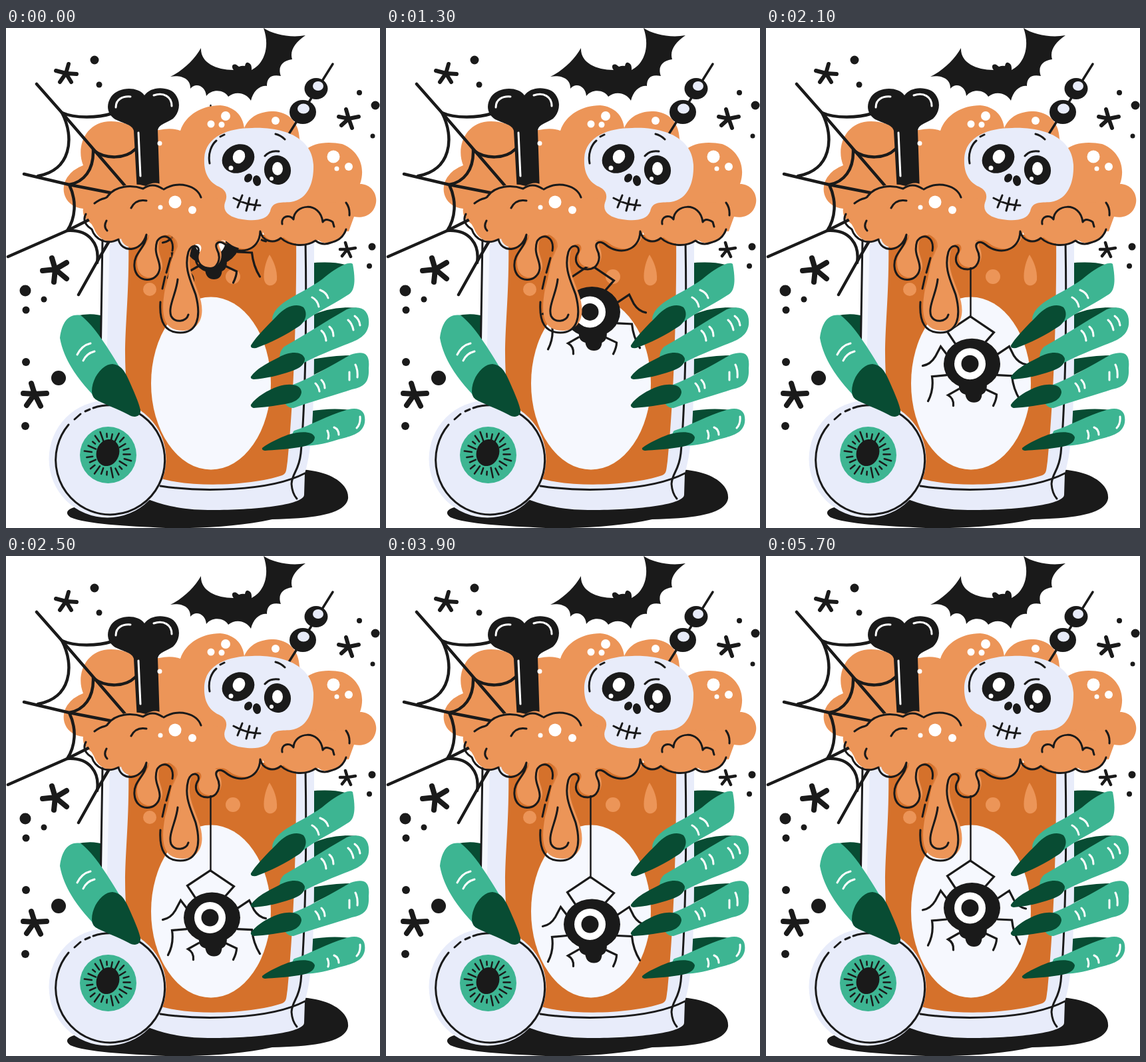
An HTML page that plays this animation: 562 px wide and 750 px high, repeating every 8 s.

```html
<!DOCTYPE html>
<html lang="en">
<head>
<meta charset="utf-8">
<title>Spooky drink</title>
<style>
html, body { margin: 0; width: 100%; height: 100%; overflow: hidden; background: #fff }
svg { display: block; width: 100vw; height: 100vh }
.ink { fill: #1a1a1a }
.dark { fill: #d5712b }
.foam { fill: #ec9558 }
.pale { fill: #e8ecfa }
.milk { fill: #f6f8fe }
.white { fill: #fff }
.skin { fill: #3db592 }
.nail { fill: #084c33 }
.line { fill: none; stroke: #1a1a1a; stroke-width: 3; stroke-linecap: round; stroke-linejoin: round }
.shine { fill: none; stroke: #fff; stroke-width: 3; stroke-linecap: round }
</style>
</head>
<body>
<svg viewBox="0 0 562 750">
  <!-- floor shadow -->
  <path class="ink" d="M440 662C490 664 516 685 514 706C510 728 468 736 400 737C350 748 290 751 240 750C180 747 120 744 97 734C86 727 94 719 110 718L300 700Z"/>

  <!-- bat -->
  <path class="ink" d="M293 30C292 52 315 63 342 63C338 58 340 53 346 55L350 58Q355 56 359 57Q360 51 364 52Q370 54 369 63C388 54 397 28 387 0C402 10 428 15 450 11C434 22 426 34 430 47C415 49 408 58 413 72C398 69 392 75 392 87C382 85 371 95 368 109C361 97 345 94 334 103C328 92 309 91 301 102C300 87 285 81 277 91C278 76 263 70 247 73C264 65 283 48 293 30Z"/>

  <!-- stars and dots -->
  <g class="line" style="stroke-width:6">
    <path d="M90 68L94 54M90 68L106 69M90 68L98 81M90 68L81 81M90 68L75 64"/>
    <path d="M515 136L511 122M515 136L530 133M515 136L520 150M515 136L504 146M515 136L500 133"/>
    <path style="stroke-width:4.500" d="M513 332L510 322M513 332L525 330M513 332L518 343M513 332L505 342M513 332L502 332"/>
    <path style="stroke-width:8" d="M74 362L69 345M74 362L91 352M74 362L91 376M74 362L72 381M74 362L55 364M43 549L38 533M43 549L61 548M43 549L52 567M43 549L31 566M43 549L26 548"/>
  </g>
  <g id="dots" class="ink"></g>

  <!-- backs of the fingers -->
  <path class="nail" d="M455 353Q490 349 514 356L455 392ZM455 433Q490 416 528 420L455 468ZM455 498Q490 491 522 491L455 524ZM455 575Q490 569 517 573L455 603ZM104 432Q130 426 148 433L148 475Z"/>

  <!-- glass -->
  <path class="pale" d="M148 310L141 560L180 690C225 718 270 723 310 723C370 723 448 716 448 700L449 668C458 640 463 590 463 480V310Z"/>
  <path class="milk" d="M145 310L141 556L150 556L156 310Z"/>
  <path class="dark" d="M184 310C186 410 176 460 180 520C184 570 205 620 226 674C280 691 370 686 415 671C422 668 421 663 423 650C432 560 437 430 436 310Z"/>
  <path class="line" d="M145 318L141 560M450 320C452 430 450 560 443 638C440 665 430 667 429 684Q430 698 437 706M232 687C290 696 395 696 449 668"/>
  <ellipse class="milk" cx="308" cy="533" rx="90" ry="129.500"/>
  <g class="foam">
    <circle cx="216" cy="392" r="10"/><circle cx="341" cy="373" r="11"/>
    <path d="M396 340C390 350 386 368 388 378C391 390 404 388 407 378C408 363 402 349 396 340Z"/>
  </g>

  <!-- spider, with its body centred on the origin -->
  <g id="spider">
    <path class="line" style="stroke-width:2.500" d="M-2 -203V-70"/>
    <g class="line" style="stroke-linejoin:miter;stroke-width:3.200">
      <path d="M-25 -30L-37 -48L-2.500 -71L33 -47L18 -30"/>
      <path d="M-37 -13L-47 -26L-55 -11Q-62 1 -74 3M38 -14L56 -26L63 -12Q70 -1 81 1"/>
      <path d="M-38 17L-60 19Q-57 39 -66 56M38 17L60 18Q62 38 72 54"/>
      <path d="M-20 38L-36 47Q-27 52 -28 63M20 38L37 46Q37 53 32 63"/>
    </g>
    <ellipse class="ink" rx="42.500" ry="38"/>
    <path class="ink" d="M-19 28Q-22 43 -10 46Q-8 58 3 58Q14 58 15 46Q24 42 22 28Z"/>
    <circle class="white" cx="-3" cy="0" r="23.500"/>
    <circle class="ink" cx="-3" cy="0" r="13"/>
  </g>

  <!-- back foam and web -->
  <path class="foam" d="M116 206C105 180 118 140 158 140C172 140 186 144 194 152L230 153Q248 149 262 154C270 130 295 116 322 116C344 118 356 132 358 150C366 132 382 125 402 125C424 126 440 140 441 166L449 184C462 171 485 170 505 174C530 184 541 208 532 234C548 234 558 248 556 262C553 280 538 286 523 283L515 305L150 310L126 292Q114 284 116 271C88 268 80 242 92 224Q100 212 116 206Z"/>
  <g class="line" style="stroke-width:4.500">
    <path d="M46 84L84 127L186 245M27 219L95 235L172 250M3 343L92 304L124 288M109 400L136 352L156 318"/>
    <path d="M84 127C104 136 138 135 160 128M84 127C104 165 97 214 48 222M131 183C150 198 180 196 194 182M131 183C132 213 117 231 95 235C107 260 104 286 92 304C126 302 141 325 137 352"/>
  </g>

  <!-- bone -->
  <path class="ink" d="M208 101C198 87 169 88 158 103C149 117 153 130 164 137C176 143 190 145 192 154L197 245L231 245L228 153C230 144 241 143 251 136C265 123 262 100 246 93C231 87 215 91 208 101Z"/>
  <path class="shine" d="M165 119C165 107 175 102 187 103M222 101C237 96 249 103 249 117M199 157L202 222"/>

  <!-- front foam with drips; the ink sits slightly off the fill -->
  <path class="foam" transform="translate(4 -3)" d="M118 286C116 268 130 256 150 255C160 239 185 234 206 240Q220 231 235 240C260 228 286 236 293 254L330 262L420 262L508 265C522 288 507 321 488 324Q476 329 465 321C448 332 425 328 413 317C401 327 385 321 382 308C381 336 349 341 330 325C320 317 313 323 317 332C324 347 317 362 303 362C287 362 281 348 289 336C292 326 279 322 274 336C267 361 278 380 285 400C298 434 287 457 262 457C232 457 228 433 235 394C242 373 242 354 250 334C254 313 235 306 227 320C221 339 232 348 231 361C228 383 195 384 193 358C191 337 211 330 211 312C203 338 173 337 169 319C150 329 134 320 128 303Z"/>
  <path class="dark" opacity=".65" d="M238 311Q258 310 258 328L250 346Q255 320 238 311ZM314 319Q324 315 333 324L322 322Z"/>
  <g class="line">
    <path d="M133 263C147 252 150 258 153 252C165 236 189 235 206 241Q220 231 235 241M237 242C260 228 287 237 293 254M188 270Q195 256 211 259M151 289Q146 298 152 304"/>
    <path d="M120 279Q113 292 129 302C134 318 152 326 169 317C173 337 203 338 211 310C211 330 191 337 193 358C195 384 228 383 231 361C232 348 221 339 227 320C235 306 254 313 250 334M247 345L241 367M239 373L235 391M232 411C230 441 239 457 262 457C287 457 294 434 285 400C278 380 267 361 274 336C279 322 292 326 289 336C281 348 287 362 303 362C317 362 325 347 317 332C313 323 320 317 330 325C349 341 381 336 382 305C385 319 401 325 413 315C425 326 448 330 465 319Q476 327 488 322Q506 318 511 302M511 262Q517 270 516 281"/>
    <path d="M258 377C256 398 243 418 248 432C254 443 271 441 274 430M415 294C413 282 426 279 432 287C433 264 472 259 476 291Q480 284 491 291L493 298"/>
  </g>
  <g id="froth" class="white"></g>

  <!-- skewer -->
  <path class="line" style="stroke-width:3.500" d="M491 54L420 167"/>
  <ellipse class="ink" cx="466" cy="91" rx="17.500" ry="16"/>
  <ellipse class="ink" cx="446" cy="126" rx="20" ry="18"/>
  <ellipse class="pale" cx="469" cy="87" rx="8" ry="7"/>
  <ellipse class="pale" cx="447" cy="121" rx="9" ry="7.500"/>

  <!-- skull -->
  <path class="pale" d="M298 195C300 162 335 150 370 150C412 148 460 162 462 205C463 237 450 258 428 261C412 262 400 260 397 275C392 288 375 290 355 287C335 284 325 275 329 262C334 250 330 243 320 238C303 230 297 215 298 195Z"/>
  <path class="line" d="M306 203C303 188 309 175 316 169M322 163L328 160M405 159Q413 161 419 167M389 192Q397 183 410 185M342 255Q361 266 382 266M355 251L348 269M366 255L361 274M377 258L373 273"/>
  <g class="ink">
    <ellipse cx="349" cy="196" rx="25" ry="21" transform="rotate(-25 349 196)"/>
    <ellipse cx="408" cy="213" rx="20" ry="22" transform="rotate(-10 408 213)"/>
    <ellipse cx="364" cy="225" rx="5.500" ry="7" transform="rotate(35 364 225)"/>
    <ellipse cx="377" cy="229" rx="6" ry="8" transform="rotate(-12 377 229)"/>
  </g>
  <g class="white">
    <ellipse cx="350" cy="193" rx="9" ry="10.500" transform="rotate(25 350 193)"/>
    <ellipse cx="408" cy="211" rx="8" ry="10"/>
    <circle cx="338" cy="210" r="3.500"/><circle cx="399" cy="226" r="3"/>
  </g>

  <!-- fingers -->
  <path class="skin" d="M400 437C401 412 445 399 475 377C495 360 515 349 521 354C525 375 525 392 516 399C490 416 470 424 446 442L412 457ZM418 478C450 460 480 440 512 422C535 414 547 425 545 445C543 461 530 468 510 475C480 487 455 497 430 512C412 512 405 490 418 478ZM426 537C460 525 490 505 518 490C540 483 547 490 545 510C546 530 540 538 520 542C490 552 460 560 432 570C415 570 410 545 426 537ZM433 604C460 595 485 580 515 572C535 568 541 578 539 592C536 608 520 612 500 617C475 625 460 627 440 627C430 625 428 608 433 604Z"/>
  <path class="nail" d="M368 476C376 463 393 446 407 432C420 417 437 412 447 419C454 428 450 440 441 447C420 461 398 472 376 480Q367 481 368 476ZM368 523C377 510 396 501 410 494C426 485 445 484 449 496C449 506 440 511 428 515C410 521 390 526 372 527Q367 526 368 523ZM368 565C376 553 394 543 408 538C426 532 443 534 444 546C443 557 432 562 420 564C402 567 388 569 372 570Q367 568 368 565ZM385 630C395 622 411 615 424 610C441 605 461 604 464 614C463 624 452 627 440 629C421 632 402 633 389 634Q384 633 385 630Z"/>
  <path class="shine" d="M460 404Q468 408 470 418M472 393Q482 397 484 405M474 454Q480 459 481 469M486 448Q492 453 492 462M514 438Q520 443 522 453M524 432Q531 437 532 446M465 533Q470 538 471 545M474 528Q479 533 479 540M516 516V528M525 505Q529 513 528 524M483 604Q486 610 484 616M493 599Q500 602 500 610M532 583Q533 594 527 600"/>

  <!-- eyeball -->
  <circle class="pale" cx="152.500" cy="646.500" r="88"/>
  <path class="line" d="M131 570A82 82 0 1 1 94 595M103 587L112 579M119 575L126 572"/>
  <circle class="skin" cx="153.500" cy="640.500" r="42.500"/>
  <g id="rays" class="line" style="stroke-width:2.500"></g>
  <ellipse class="ink" cx="153" cy="637" rx="17" ry="20.500" transform="rotate(20 153 637)"/>

  <!-- thumb -->
  <path class="skin" d="M81 465C84 440 95 428 112 431C134 447 158 488 174 514L140 560C118 538 88 505 81 465Z"/>
  <path class="nail" d="M129 545C129 525 145 504 160 504C173 505 179 516 184 527C192 545 199 560 202 573C203 584 192 585 184 580C167 571 150 565 138 559Q129 555 129 545Z"/>
  <path class="shine" d="M107 490Q114 476 127 473M116 499Q121 488 133 485"/>
</svg>
<script>
const byId = id => document.getElementById(id);
const circles = (id, list) => byId(id).innerHTML =
  list.map(([x, y, r]) => `<circle cx="${x}" cy="${y}" r="${r}"/>`).join('');

circles('dots', [
  [133, 48, 6.5], [140, 85, 4.5], [531, 97, 4], [555, 116, 6.5], [551, 162, 3.5],
  [550, 328, 5.5], [546, 357, 4], [29, 394, 8.5], [57, 407, 4.5], [30, 423, 5.5],
  [30, 501, 6], [79, 525, 11], [29, 597, 6]
]);
circles('froth', [
  [254, 261, 9.5], [232, 269, 3.5], [280, 273, 6], [330, 132, 7], [308, 144, 5.5],
  [324, 145, 4.5], [405, 139, 6], [492, 193, 9.5], [515, 208, 6], [497, 211, 3.5], [231, 173, 3.5]
]);

byId('rays').innerHTML = Array.from({ length: 23 }, (_, i) => {
  const a = i / 23 * 2 * Math.PI, inner = 23 + 3 * Math.sin(i * 2.3), outer = 33 + 3 * Math.sin(i * 1.7);
  const at = r => `${153.5 + r * Math.cos(a)} ${639.5 + r * Math.sin(a)}`;
  return `<path d="M${at(inner)}L${at(outer)}"/>`;
}).join('');

// The spider drops, rests, then climbs a little, in 100 ms steps.
const LOOP = 8000, STEPS = 25;
const steps = (t, start) => Math.max(0, Math.min(STEPS, Math.floor((t - start) / 100) + 1));
const spider = byId('spider');

function draw(now) {
  const t = now % LOOP;
  const y = 319 + 9.72 * steps(t, 300) - 1.36 * steps(t, 3300);
  spider.setAttribute('transform', `translate(309.5 ${y})`);
  requestAnimationFrame(draw);
}
draw(0);
</script>
</body>
</html>
```
